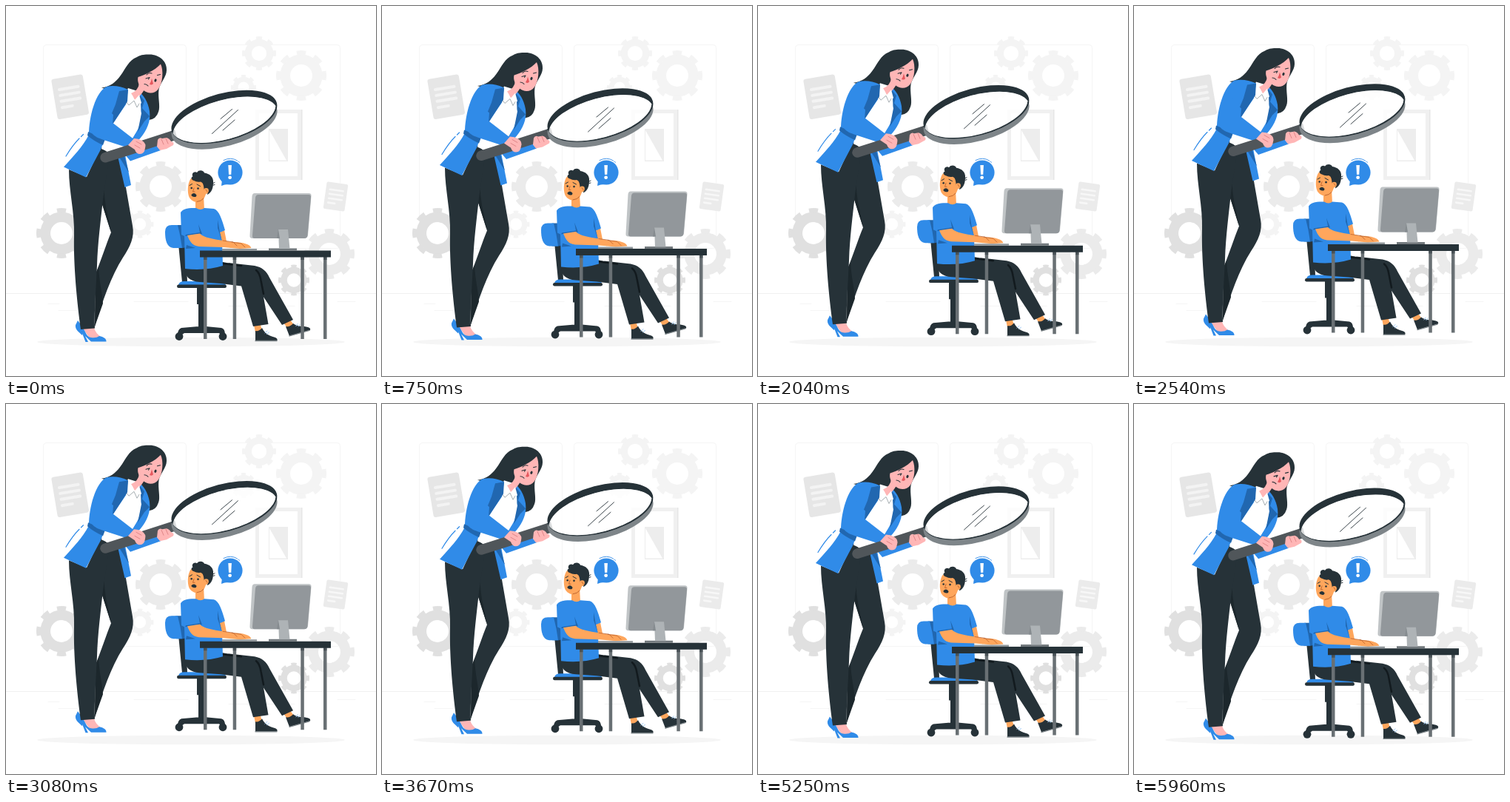
Recreate the animation shown at these times as an HTML page. Size 500 by 500 pixels, loop 6 s.

```html
<!DOCTYPE html>
<html lang="en">
<head>
<meta charset="utf-8">
<title>Under the lens</title>
<style>
html, body { margin: 0; width: 100%; height: 100%; overflow: hidden; background: #fff; }
svg { display: block; width: 100vw; height: 100vh; }
.line { fill: none; stroke-linecap: round; stroke-linejoin: round; }
.ink { fill: #263238; }
.blue { fill: #308be8; }
.navy { fill: #2167b0; }
.rose { fill: #ffb6b6; }
.tan { fill: #ffa65c; }
.white { fill: #fff; }
</style>
</head>
<body>
<svg viewBox="0 0 500 500">
  <!-- room -->
  <g class="line" stroke="#f5f5f5">
    <rect x="50.5" y="52.5" width="193" height="275" rx="4"/>
    <rect x="259.5" y="52.5" width="192" height="275" rx="4"/>
    <path stroke="#f0f0f0" d="M0 388.5H500"/>
    <path d="M57 402.5H72M173 399.500H246M71 411.500H96M301 405.500H390M448 399.500H472"/>
  </g>
  <g id="gears" fill="none"></g>
  <g transform="translate(86.700 122.700) rotate(-9.500)">
    <rect x="-21.500" y="-27.500" width="43" height="55" rx="3" fill="#e6e6e6"/>
    <path class="line" stroke="#f3f3f3" stroke-width="4" d="M-13-12H13M-13-4H13M-13 4H13M-13 12.500H1"/>
  </g>
  <g transform="translate(445.500 257.500) rotate(8)">
    <rect x="-14.500" y="-18.500" width="29" height="37" rx="2" fill="#ebebeb"/>
    <path class="line" stroke="#f7f7f7" stroke-width="2.600" d="M-9-8.500H9M-9-2.500H9M-9 3.500H9M-9 9.500H0"/>
  </g>
  <path fill="#f0f0f0" d="M337 140H400V235H337Z"/>
  <path fill="#e6e6e6" d="M399 140H400.500V235H399Z"/>
  <path class="white" d="M342 145H394V230H342Z"/>
  <path fill="#ededed" d="M355 166H381V210H355Z"/>
  <path class="white" d="M356 168V208.500H379Z"/>
  <ellipse cx="250" cy="454" rx="208" ry="6.300" fill="#f5f5f5"/>

  <!-- speech bubble -->
  <circle class="blue" cx="303" cy="225" r="16.600"/>
  <path class="blue" d="M291 243L292 235L301 241Q295 241 291 243Z"/>
  <path class="line" stroke="#308be8" stroke-width=".9" d="M294 208.500Q304 203.500 312.500 209M314 210L315.500 211.300"/>
  <text x="302.500" y="233.800" text-anchor="middle" fill="#fff" font-size="27" font-weight="700" font-family="'Open Sans', sans-serif">!</text>

  <g id="float">
    <!-- chair -->
    <path class="ink" d="M233 322H243L245 373H238ZM258 380H267V436H260V403H258ZM237 435L260 433H270L291 435Q296 436 296 444H290L288 442H241L238 444H232Q232 437 237 435Z"/>
    <circle class="ink" cx="234" cy="446.500" r="5.400"/>
    <circle class="ink" cx="293" cy="446.500" r="5.400"/>
    <rect class="navy" x="225" y="296" width="20" height="31" rx="6"/>
    <path class="blue" d="M224 296H232Q236 311 238 327H226C217 326 215 316 215 305Q215 296 224 296Z"/>
    <path class="blue" d="M233 377Q234 372 241 372H288Q296 373 297 377Z"/>
    <rect class="ink" x="231" y="376.500" width="67" height="4.400" rx="2.200"/>

    <!-- seated man -->
    <path class="tan" d="M375 428L384 424L389 431L380 435ZM335 431H344L346 439L337 441Z"/>
    <path class="ink" d="M300 347L336 351C346 353 352 358 356 367L388 424L373 431L336 375Z"/>
    <path class="ink" d="M242 352L293 346L330 353C338 355 342 360 344 370L354.500 430L334 433L318 378.500L290 375L262 373C248 372 241 366 242 352Z"/>
    <path class="line" stroke="#121a1e" stroke-width="2.500" d="M338 357Q343 361 344.500 371L348 389M293 348L318 351"/>
    <path class="ink" d="M337 439Q342 440 346 435C350 444 358 446 364 448Q368 450 366 452.500H337Z"/>
    <path class="ink" d="M378 433Q384 434 388 429C394 434 402 432 408 434Q412 435 411 438L383 446Z"/>
    <path class="line" stroke="#7b8387" stroke-width="1.300" d="M337 452.500H366M383 446L410 438.500"/>
    <path class="line" stroke="#9cc8f7" stroke-width="1" d="M350 442L353 439M352.500 443.500L355.500 441M392 432.500L394 429.500M395 433L397 430.500"/>
    <path class="tan" d="M287 305L295 303L298 318L310 320L304 327L290 320Z"/>
    <path class="tan" d="M256 258L267 255L268 276Q262 280 256 276Z"/>
    <path class="blue" d="M236 279C240 273 248 273 257 273Q263 277 268 273L281 274C288 276 292 289 296 303L289 306L292 318L293 351Q270 358 242 355L241 311L237 309Z"/>
    <path class="navy" d="M260 295L265 308L257 308L242 311L243 309L262 306ZM286 289L289 306L292 318L286 300ZM244 323L256 327L243 328Z"/>
    <path class="tan" d="M245 310L262 307.500C267 313 280 315 293 317L305 319.500C315 318.500 330 321 331.500 327L316 328L294 326L261 325C251 324 248 317 245 310Z"/>
    <path class="line" stroke="#b9602c" stroke-width=".8" d="M293 317L307 319L312 324M305 319L318 321L323 326"/>
    <path class="tan" d="M250 233C246 238 245 248 246.500 255C248 263 256 266.500 262 264C267 262 269 258 270 254Q275 254 276 247L270 233Z"/>
    <path class="ink" d="M254 236C250 235 249.500 231 252.500 230.500C250 226 255 222.500 258 225C261 220.500 267.500 222.500 268 225.500C275 226.500 281 231 280 239C280 246 278 252 272 255Q274 247 270 247L268 250C267 243 267 239 263 237.500Q258 238.500 254 236Z"/>
    <circle class="tan" cx="270.500" cy="249.500" r="3.400"/>
    <circle class="ink" cx="250.700" cy="246" r="1.300"/>
    <circle class="ink" cx="259.500" cy="246.600" r="1.300"/>
    <path class="ink" d="M250.500 255Q254 251 257.500 255.500Q257.500 258.500 254 258Q250 257 250.500 255Z"/>
    <path class="line" stroke="#263238" stroke-width="1" d="M248 242.500L251.500 240.500M258 241L262.500 243.500M279 240L282 238.500M280 242L282 241.500"/>
    <path class="line" stroke="#b9602c" stroke-width=".9" d="M254 246L252.500 251L255 251M270 248L272 251M258 264.500Q264 264 267 260"/>

    <!-- desk -->
    <path fill="#697074" d="M267 339H271.500V450H267ZM306.700 339H311.200V450H306.700ZM398.300 339H402.800V450H398.300ZM429 339H433.500V450H429Z"/>
    <path fill="#495257" d="M267 339H271.500V343H267ZM306.700 339H311.200V343H306.700ZM398.300 339H402.800V343H398.300ZM429 339H433.500V343H429Z"/>
    <path class="ink" d="M262 330.500H439V339.500H262Z"/>
    <path fill="#8e9599" d="M292 328H339V330.500H292Z"/>
    <path fill="#c0c4c6" d="M336 253H409Q413 253 412.500 257L408 310Q407 314 403 314H333Q329 314 329.500 310L332.500 257Q333 253 336 253Z"/>
    <path fill="#92979b" d="M341 255H409Q412.500 255 412 259L407.500 310Q407 314 403 314H336Q332.500 314 333 310L337 259Q337.500 255 341 255Z"/>
    <path fill="#72797d" d="M355 327.500H393V330.500H355Z"/>
    <path fill="#aeb3b6" d="M368 302H381L383.500 328H369Z"/>
    <path fill="#858b8f" d="M366 314L368 302L370 314Z"/>

    <!-- standing woman -->
    <path class="blue" d="M97 425L94 431C93 437 98 440 103 445L106 437Z"/>
    <path class="rose" d="M104 436L119 435Q121 442 128 447L114 450Z"/>
    <path class="blue" d="M102 436L105 437C108 441 109 447 115 448Q122 449 126 446C132 447 136 450 135.500 453.500H115L107 446L111 454H107.500L104 445Z"/>
    <path class="ink" d="M128 195L155 203L162 245L171 297C174 312 168 325 158 340C142 365 130 400 120 433L121 362C128 345 136 320 142 306L130 268Z"/>
    <path fill="#1c272c" d="M121 362L125 353C126 373 130 387 131 402L120 433ZM133 230Q131 260 138 285L142 306L130 268Z"/>
    <path class="ink" d="M128 190L109 231L85 221C85 250 93 280 92 310C91 350 96 400 101 437L120 435.500C119 410 122 380 123 350C124 320 128 290 131 262L140 200Z"/>
    <path class="ink" d="M129 110.500C141 109 148 103 154 95C163 83 165 74 177 69C183 65.500 188 65.500 193 65.500C207 65 218 75 217 87C217 96 208 104 206.500 113C205 124 209 136 206 143Q203 153 193 154L176 118C163 110 148 117 129 110.500Z"/>
    <path class="blue" d="M178 115C186 119 192 130 194 142C196 156 190 168 182 178L161 201L169 242L160.500 245L151 203L164 185C175 175 184 160 183 145Z"/>
    <path class="navy" d="M179 118L187 128L184 138L194 149L187 156L178 170L183 145ZM153 204L164 200L160 203L166 225Z"/>
    <path class="white" d="M165 111L178 115L182 132C184 150 178 170 166 187L153 204L129 193L134 175L147 150Z"/>
    <path class="rose" d="M180 104Q179 114 169 118L174 127Q181 123 187 113Z"/>
    <path class="white" d="M165 113L171 121L174 127L180 120L183 131L178 136L173 128L166 134L160 126Z"/>
    <path class="line" stroke="#8e989d" stroke-width=".8" d="M160 126L166 134L173 128L177 137L180 132"/>
    <path class="rose" d="M178.500 96C188 93 201 87 209 78.500C213 87 212 103 206 112C201 119 192 119 186 114C180 109 177 102 178.500 96Z"/>
    <path class="line" stroke="#263238" stroke-width="1.100" d="M190 93Q193 89.500 197 91M204.500 93.500L208.500 92.500M189 98L194 96.500L192.500 99M187 105.500Q190 105.500 192 108"/>
    <ellipse class="ink" cx="202" cy="100.500" rx="1.500" ry="2.200" transform="rotate(20 202 100.500)"/>
    <path fill="#e6595f" d="M197 98Q196 103 194 105.500Q197 107.500 199 105Z"/>
    <path class="blue" d="M136 109Q150 106 165 113L162 133L145 158L134 178L128 194L108 231.500L78 217.500C91 203 103 191 112 174C112 150 121 116 136 109Z"/>
    <path class="navy" d="M153 115L165 113L164 129L144 160L145 147L143 145L148 133Z"/>
    <path class="navy" d="M111 170L134 180L131 188Q118 182 110 175Z"/>
    <path class="blue" d="M125 124L143 145V157L174 181L166 192L132 181C117 176 112 171 115 158Z"/>
    <path class="line" stroke="#308be8" stroke-width="1.200" d="M81 203Q90 188 99 179M101.500 176.500L104.500 173.500"/>
    <path class="blue" d="M161 201L205 188L209 195L168 209.500Z"/>

    <!-- magnifier -->
    <path class="line" stroke="#50565a" stroke-width="13.500" d="M134 204.800L180 190.300"/>
    <path fill="#50565a" d="M178 183.500L226 168L230 181L180 197Z"/>
    <path class="ink" d="M223 169L228 167L232 181L227 182Z"/>
    <path class="rose" d="M165 188L173 179Q179 179 184 182Q190 186 188 192Q187 200 181 200Q176 200 174 194Z"/>
    <path class="rose" d="M204 190L205 181Q207 177 211 179L217 178Q221 179 223 183Q228 184 226 188L217 193L208 195Z"/>
    <path class="line" stroke="#d77a7d" stroke-width=".8" d="M176 183L183 187M174 188L181 192M210 180L213 187M216 179L219 186"/>
    <g transform="translate(295 153.700) rotate(-15)" fill-rule="evenodd">
      <path id="edge" fill="#7e8589"/>
      <path id="rim" class="ink"/>
      <path id="glass" class="white" fill-opacity=".82"/>
    </g>
    <path class="line" stroke="#263238" stroke-width=".9" d="M290 152.500L305.500 139.500M278.500 172.500L313.500 140.500M293 168L309 154"/>
  </g>
</svg>
<script>
const get = id => document.getElementById(id);

// x, y, outer radius, colour
const gears = [
  [342, 64, 23, '#f4f4f4'], [399, 94, 34, '#f4f4f4'], [321, 110, 17, '#f4f4f4'],
  [209, 244, 34, '#ebebeb'], [75, 307, 34, '#e0e0e0'], [181, 295, 18.500, '#f4f4f4'],
  [437, 335, 34, '#ebebeb'], [389, 370.500, 21, '#e0e0e0']
];
get('gears').innerHTML = gears.map(([x, y, r, color]) => `
  <g transform="translate(${x} ${y})" stroke="${color}">
    <circle r="${r * .64}" stroke-width="${r * .4}"/>
    <circle r="${r * .9}" stroke-width="${r * .2}" pathLength="80" stroke-dasharray="5 5" stroke-dashoffset="2.500"/>
  </g>`).join('');

// The glass is where the upper and lower ends of the round rim overlap.
const oval = (x, y, rx, ry) =>
  `M${x - rx} ${y}a${rx} ${ry} 0 1 0 ${2 * rx} 0a${rx} ${ry} 0 1 0 ${-2 * rx} 0Z`;
const glass = 'M-71.8 0A72.5 31 0 0 1 71.8 0A72.5 31 0 0 1 -71.8 0Z';
get('rim').setAttribute('d', oval(.9, -3.6, 73.5, 32) + glass);
get('edge').setAttribute('d', oval(-.9, 3.6, 73.5, 32) + glass);
get('glass').setAttribute('d', glass);

// steady rise and fall of 10 px over six seconds
const float = get('float');
function draw() {
  const t = performance.now() % 6000;
  const rise = 10 * (1 - Math.abs(1 - t / 3000));
  float.setAttribute('transform', `translate(0 ${-rise})`);
  requestAnimationFrame(draw);
}
draw();
</script>
</body>
</html>
```
